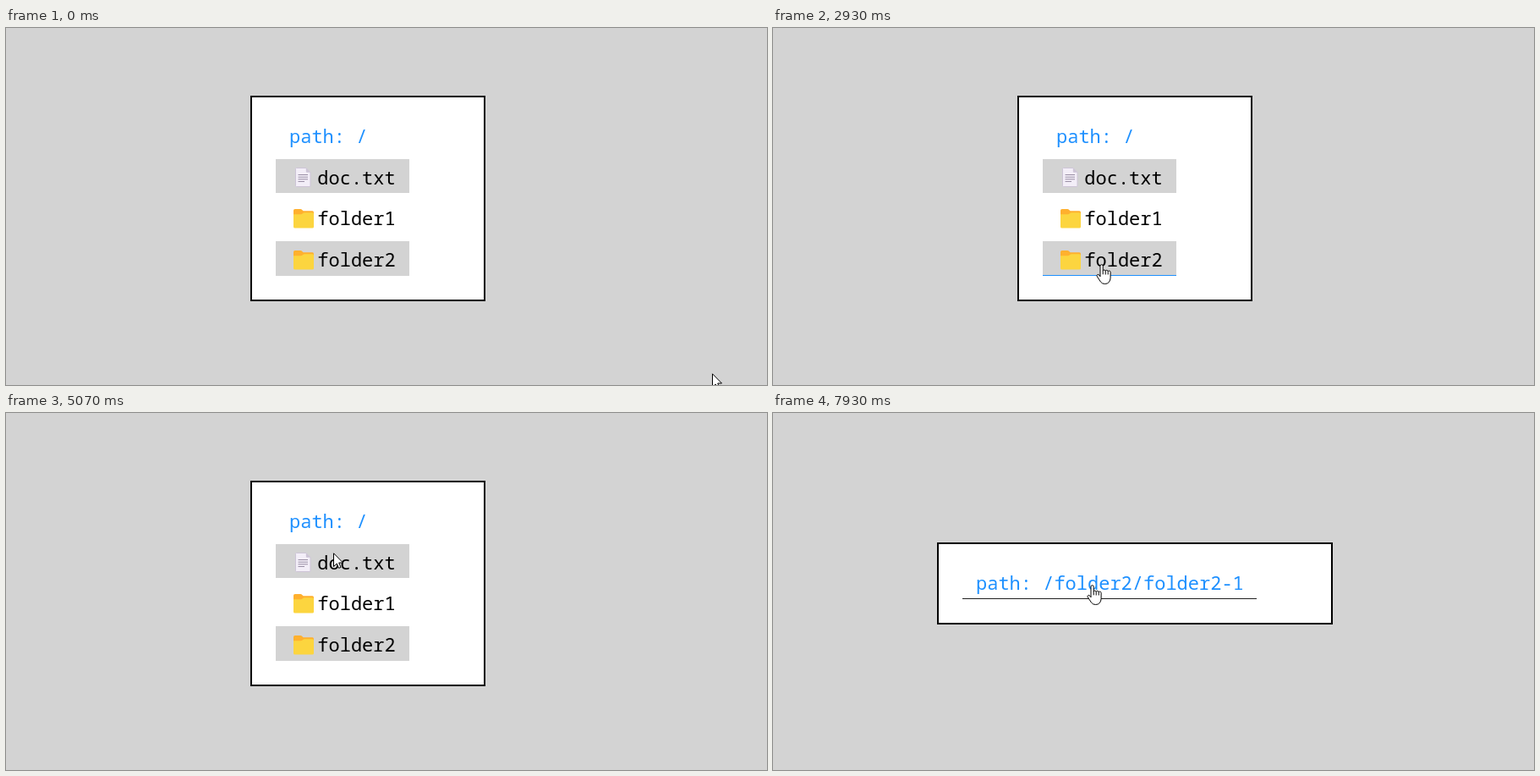
Animation, 900 px wide and 422 px high, one loop 8000 ms. Source, as an HTML page:

```html
<!DOCTYPE html>
<html lang="en">
<head>
<meta charset="utf-8">
<title>File browser</title>
<style>
html, body { margin: 0; width: 100%; height: 100%; overflow: hidden; background: #d3d3d3; }
svg { display: block; }
text { font: 22px "Noto Sans Mono", "DejaVu Sans Mono", monospace; white-space: pre; }
.path { fill: #1e90ff; }
.panel { fill: #fff; stroke: #000; stroke-width: 2; }
.cursor { fill: #fff; stroke: #000; stroke-linejoin: round; }
</style>
</head>
<body>
<svg id="stage" width="900" height="422" viewBox="0 0 900 422">
  <defs>
    <g id="folder">
      <path fill="#ffb02e" d="M0 1.8Q0 0 1.8 0H8.2Q9.4 0 10.2 .9L11.6 2.3H22.4Q24 2.3 24 4V12H0z"/>
      <path fill="#fcd53f" d="M0 6.2H8.6Q9.7 6.2 10.6 5.4L11.2 4.9Q12 4.3 13 4.3H22.6Q24 4.3 24 5.8V21Q24 22.6 22.4 22.6H1.6Q0 22.6 0 21z"/>
    </g>
    <g id="file">
      <path fill="#f3eef8" stroke="#cdc4d6" d="M.5 1.5Q.5 .5 1.5 .5H12.8L18 5.8V21.5Q18 22.5 17 22.5H1.5Q.5 22.5 .5 21.5z"/>
      <path fill="#cdc4d6" d="M12.8 .5L18 5.8H14Q12.8 5.8 12.8 4.6z"/>
      <path fill="none" stroke="#998ea4" d="M3.5 8.5H15M3.5 11.2H15M3.5 13.8H15M3.5 16.5H11"/>
    </g>
  </defs>
  <g id="views"></g>
  <g id="pointer" class="cursor">
    <path id="arrow" d="M.5 .8V16.5L4.2 13 6.6 18.4 9 17.4 6.7 12H11.5z"/>
    <g id="hand" transform="translate(-6.5 .3)">
      <path d="M4.5 14.5V2a1.6 1.6 0 0 1 3.2 0V8q.2-1.3 1.5-1.3t1.5 1.5q.2-1.2 1.5-1.2t1.5 1.6q.2-.9 1.4-.9t1.5 1.6V16q0 3-1.8 5.2-1.6 2-4.8 2-3.3 0-5-2.4L.9 14.6q-.9-1.6.3-2.3t2.2.7z"/>
      <path fill="none" d="M7.7 8v4M10.7 8.2v4M13.7 8.8v3.4"/>
    </g>
  </g>
</svg>
<script>
const LOOP = 8000, FADE = 80, STEP = 10;
const BLUE = '#1e90ff', GREY = '#808080';

// rows: [text, baseline, kind, underline colour]
const views = [
  { box: [289, 80, 278, 243], x: 319, w: 158, rows: [
    ['path: /', 136, 'path', '#000'], ['doc.txt', 185, 'file'],
    ['folder1', 233, 'folder', GREY], ['folder2', 282, 'folder', BLUE]] },
  { box: [260, 105, 336, 193], x: 290, w: 216, rows: [
    ['path: /folder1', 161, 'path', '#000'], ['file.txt', 210, 'file'], ['test1.txt', 258, 'file']] },
  { box: [260, 104, 336, 194], x: 290, w: 216, rows: [
    ['path: /folder2', 160, 'path', '#000'], ['folder2-1', 209, 'folder', GREY], ['test.txt', 258, 'file']] },
  { box: [194, 153, 468, 97], x: 224, w: 348, rows: [
    ['path: /folder2/folder2-1', 209, 'path', '#000']] },
];

// [time, view] after each click
const clicks = [[0, 0], [3530, 1], [4930, 0], [6130, 2], [7870, 3]];

// pointer moves: [start, end, x, y]
const home = [835, 408];
const moves = [
  [40, 880, 391, 130], [1240, 1920, 389, 217], [1960, 2070, 389, 219],
  [2170, 2530, 389, 278], [2900, 2960, 389, 279], [2960, 3400, 390, 235],
  [4040, 4400, 387, 164], [4640, 4670, 387, 163], [5010, 5730, 389, 261],
  [5750, 5870, 390, 268], [6440, 6600, 389, 241], [6770, 7130, 378, 203],
];

const $ = id => document.getElementById(id);
const ease = p => p * p * (3 - 2 * p);

function rowMarkup(v, [label, base, kind, color], i) {
  const top = base - 30;
  let out = '';
  if (kind === 'path') {
    out = `<text class="path" x="${v.x + 16}" y="${base}">${label}</text>`;
  } else {
    const isFile = kind === 'file';
    if (i % 2) out += `<rect x="${v.x}" y="${top}" width="${v.w}" height="${isFile ? 40 : 41}" fill="#d3d3d3"/>`;
    out += `<use href="#${kind}" x="${v.x + (isFile ? 23 : 21)}" y="${base - (isFile ? 20 : 19)}"/>`
      + `<text x="${v.x + 49.3}" y="${base}">${label}</text>`;
  }
  return out + `<rect class="line" x="${v.x}" y="${base + 10}" width="${v.w}" height="1" fill="${color || 'none'}"/>`;
}

$('views').innerHTML = views.map(v => {
  const [x, y, w, h] = v.box;
  return `<g><rect class="panel" x="${x + 1}" y="${y + 1}" width="${w - 2}" height="${h - 2}"/>`
    + v.rows.map((r, i) => rowMarkup(v, r, i)).join('') + '</g>';
}).join('');
const groups = [...$('views').children];
const lines = groups.map(g => [...g.querySelectorAll('.line')]);

const lastClick = t => clicks.filter(c => c[0] <= t).pop();

function pointerAt(t) {
  let [x, y] = home;
  for (const [start, end, nx, ny] of moves) {
    if (t <= start) break;
    const p = ease(Math.min(1, (t - start) / (end - start)));
    x += (nx - x) * p;
    y += (ny - y) * p;
  }
  return [Math.round(x), Math.round(y)];
}

// index of the clickable row under the pointer, or -1
function hoverAt(t, v) {
  const [x, y] = pointerAt(t);
  if (x < v.x || x >= v.x + v.w) return -1;
  return v.rows.findIndex(([, base, kind]) => kind !== 'file' && y >= base - 30 && y < base + 11);
}

function draw(t) {
  const [since, id] = lastClick(t), v = views[id];
  groups.forEach((g, i) => g.style.display = i === id ? '' : 'none');

  // the underline fades linearly with the time spent hovering
  const weight = v.rows.map(() => 0);
  for (let s = 0; s < FADE; s += STEP) {
    if (t - s < since) break;
    const row = hoverAt(t - s, v);
    if (row >= 0) weight[row] += STEP / FADE;
  }
  lines[id].forEach((line, i) => line.setAttribute('opacity', weight[i]));

  const over = hoverAt(t, v) >= 0;
  $('pointer').setAttribute('transform', `translate(${pointerAt(t)})`);
  $('hand').style.display = over ? '' : 'none';
  $('arrow').style.display = over ? 'none' : '';
}

const begin = performance.now();
function tick() {
  draw((performance.now() - begin) % LOOP);
  requestAnimationFrame(tick);
}
tick();
</script>
</body>
</html>
```
